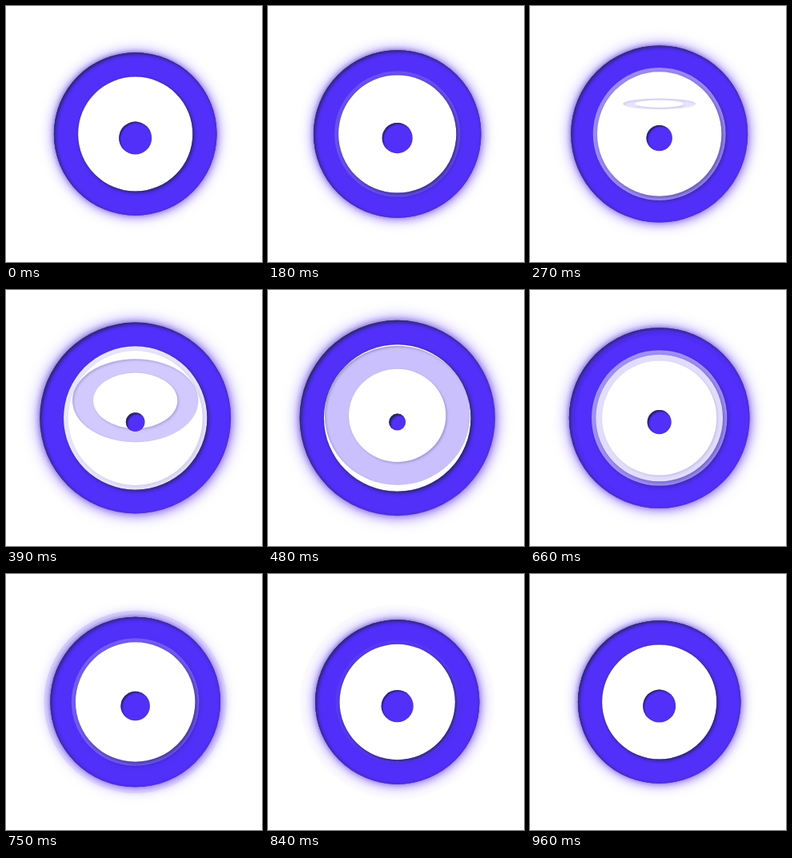
An HTML page with a canvas that plays this animation: 320x320 px, repeating every 1.08 s.

```html
<!DOCTYPE html>
<html lang="en">
<head>
<meta charset="utf-8">
<title>Radio button pulse</title>
<style>
  html, body { margin: 0; width: 100%; height: 100%; overflow: hidden; background: #fff; }
  canvas { display: block; }
</style>
</head>
<body>
<canvas id="stage" width="320" height="320"></canvas>
<script>
const ctx = document.getElementById('stage').getContext('2d');
const LOOP = 1080, STEP = 30, START = 150, END = 960;
const CX = 161.7, CY = 160, DOT_Y = 165.1;
const BLUE = '#5230fa', SHADE = 'rgba(30,40,45,.85)';
const FAR = 1000;

const clamp = x => Math.min(1, Math.max(0, x));

function ellipse(y, rx, ry = rx, hole = 0) {
  const path = new Path2D();
  path.ellipse(CX, y, rx, ry, 0, 0, Math.PI * 2);
  if (hole) {
    path.closePath();
    path.moveTo(CX + rx * hole, y);
    path.ellipse(CX, y, rx * hole, ry * hole, 0, 0, Math.PI * 2);
  }
  return path;
}

// Draws only the shadow: the shape itself stays outside the stage.
function shadow(path, offset, blur, color) {
  ctx.save();
  ctx.translate(-FAR, 0);
  ctx.shadowOffsetX = FAR + offset;
  ctx.shadowOffsetY = offset;
  ctx.shadowBlur = blur;
  ctx.shadowColor = color;
  ctx.fillStyle = '#000';
  ctx.fill(path, 'evenodd');
  ctx.restore();
}

// Fills a blue shape and darkens its edges that face the upper left.
function shaded(path, offset, blur, alpha = 1) {
  ctx.save();
  ctx.globalAlpha = alpha;
  ctx.fillStyle = BLUE;
  ctx.fill(path, 'evenodd');
  ctx.clip(path, 'evenodd');
  const outside = new Path2D(path);
  outside.rect(-50, -50, 420, 420);
  shadow(outside, offset, blur, SHADE);
  ctx.restore();
}

function halo(t, p) {
  const age = t - 200;
  if (age <= 0) return;
  const rx = 72 * (1 - Math.exp(-age / 86)) + .077 * age;
  const flat = Math.sin(clamp((t - 184) / 341) * Math.PI / 2) ** 2;
  const y = CY - 38.5 * (1 - flat * flat);
  shaded(ellipse(y, rx, rx * flat, .668), 1.5, 3, .3 * p);
}

function draw(t) {
  const active = t >= START && t < END;
  const p = active ? Math.sin(Math.PI * t / END) ** 3.3 : 0;
  const s = 1 + .2 * p;
  const outer = 101.8 * s;

  ctx.fillStyle = '#fff';
  ctx.fillRect(0, 0, 320, 320);

  const body = ellipse(CY, outer);
  shadow(body, 0, 17 * s, 'rgba(82,48,250,.65)');
  shadow(body, 1.5 * s, 9 * s, 'rgba(120,40,250,.35)');
  shadow(body, -s, 5 * s, 'rgba(40,25,90,.3)');

  ctx.fillStyle = '#fff';
  ctx.fill(ellipse(CY, 80 * s));
  shaded(ellipse(CY, outer, outer, .751), 1.7 * s, 4 * s);
  if (p < 1) shaded(ellipse(CY, outer, outer, .703), 1.7 * s, 4 * s, 1 - p);
  halo(t, p);

  shaded(ellipse(DOT_Y, 20.5 - 10 * p), 1.5 + p, 2);
}

const begin = performance.now();
function tick() {
  const t = (performance.now() - begin) % LOOP;
  draw(Math.floor(t / STEP) * STEP);
  requestAnimationFrame(tick);
}
tick();
</script>
</body>
</html>
```
